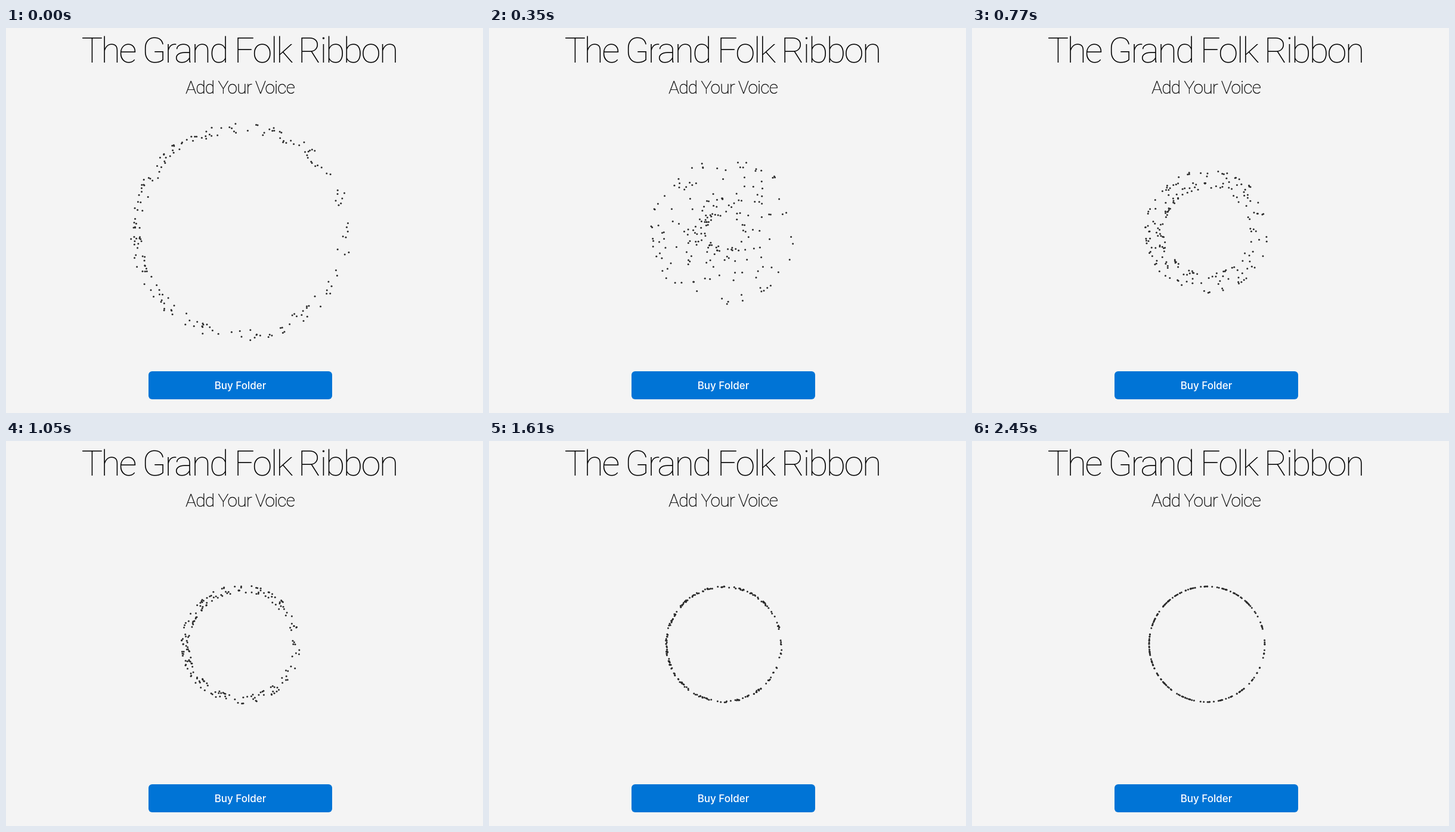
Write an HTML page that moves like this. It is 800 px wide and 646 px high and loops after 2520 ms.

```html
<!DOCTYPE html>
<html lang="en">
<head>
<meta charset="utf-8">
<title>Dot ring</title>
<style>
  html, body { margin: 0; height: 100%; overflow: hidden; background: #f4f4f4; }
  svg { display: block; width: 800px; height: 646px; }
  text { text-anchor: middle; font-family: Roboto, "Liberation Sans", sans-serif; font-weight: 100; }
  .title { font-size: 60px; letter-spacing: -2.9px; }
  .subtitle { font-size: 30px; letter-spacing: -.9px; stroke: #000; stroke-width: .35px; }
  .label { font: 500 17px Inter, sans-serif; fill: #fff; }
</style>
</head>
<body>
<svg viewBox="0 0 800 646">
  <text class="title" x="391" y="58">The Grand Folk Ribbon</text>
  <text class="subtitle" x="392.5" y="109.5">Add Your Voice</text>
  <g id="dots" fill="#2a2a2a"></g>
  <rect x="239" y="576" width="308" height="47" rx="6" fill="#0074d6"/>
  <text class="label" x="393" y="606">Buy Folder</text>
</svg>
<script>
const LOOP = 2520, STEP = 70, COUNT = 200;
const CX = 394, CY = 341, RADIUS = 97;

let seed = 7;
const random = () => (seed = seed * 16807 % 2147483647) / 2147483647;

const group = document.getElementById("dots");
const dots = Array.from({ length: COUNT }, () => {
  const el = document.createElementNS("http://www.w3.org/2000/svg", "circle");
  el.setAttribute("r", 1.5);
  group.append(el);
  return {
    el,
    angle: random() * 2 * Math.PI,
    drift: (random() - 0.5) * 0.16,
    // 0 to 1, crowded towards both ends
    speed: (1 - Math.cos(random() * Math.PI)) / 2,
    start: 68 + random() * 20
  };
});

function draw(t) {
  const decay = Math.exp(-t / 310);
  // The quickest dots overshoot inwards, the slowest simply close in
  const pull = 380 * (1 - Math.exp(-Math.pow(t / 280, 1.5)));
  for (const { el, angle, drift, speed, start } of dots) {
    const r = RADIUS + (start - pull * speed) * decay;
    const a = angle + drift * Math.exp(-t / 400);
    el.setAttribute("cx", CX + r * Math.sin(a));
    el.setAttribute("cy", CY - r * Math.cos(a));
  }
}

const origin = performance.now();
function frame() {
  const t = (performance.now() - origin) % LOOP;
  draw(Math.floor(t / STEP) * STEP);
  requestAnimationFrame(frame);
}
frame();
</script>
</body>
</html>
```
